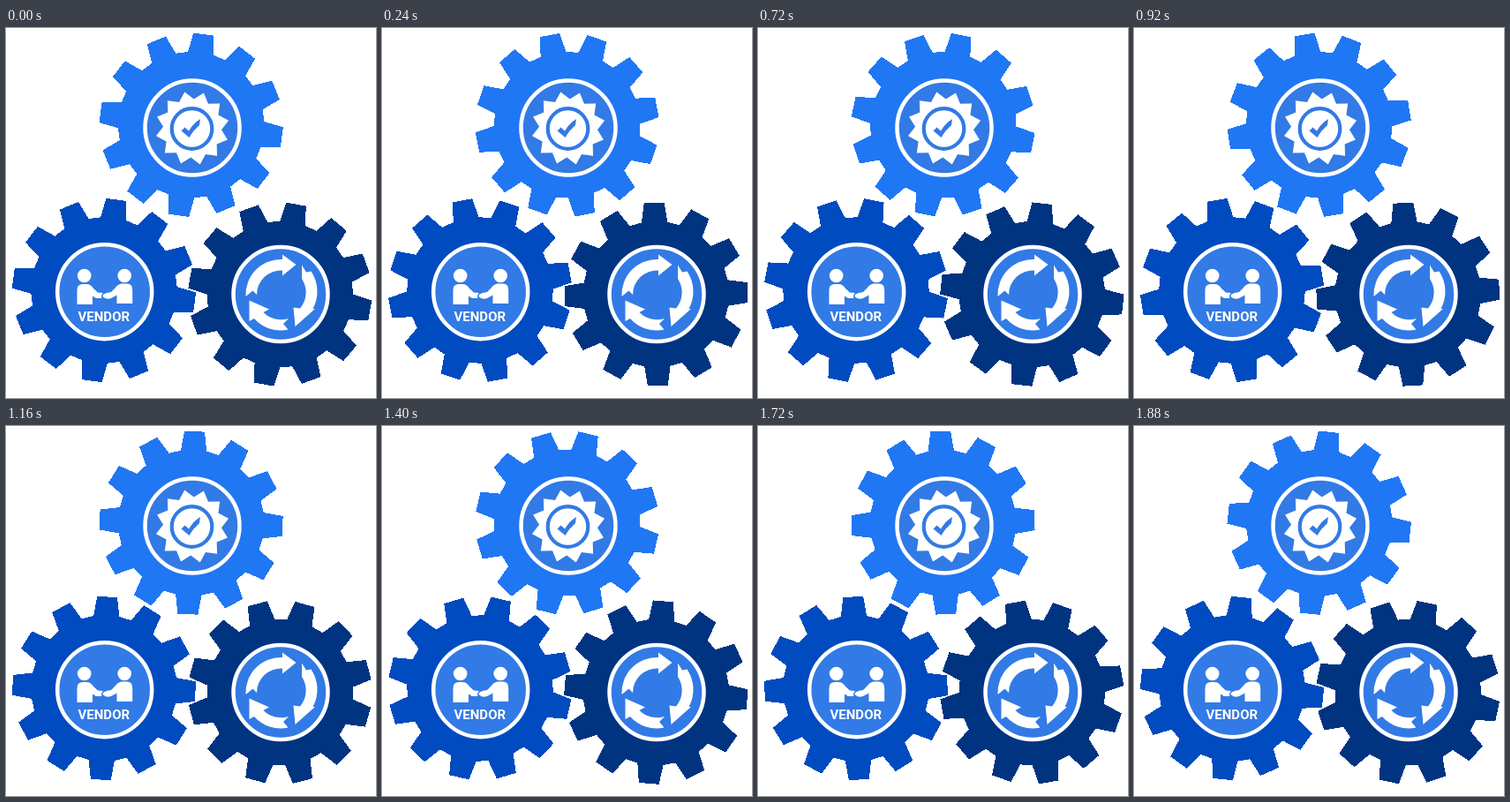
These frames come from a looping animation (419 px wide and 419 px high, 1.92 s). An HTML page:

```html
<!DOCTYPE html>
<html lang="en">
<head>
<meta charset="utf-8">
<title>Gears</title>
<style>
html, body { margin: 0; width: 100%; height: 100%; overflow: hidden; background: #fff; }
svg { display: block; width: 100vw; height: 100vh; }
.gear { shape-rendering: crispEdges; }
.disc { fill: #327ae5; stroke: #fff; stroke-width: 4.5; }
.icon { fill: #fff; }
text { font: 700 15px Roboto, Arial, sans-serif; text-anchor: middle; }
</style>
</head>
<body>
<svg viewBox="0 0 419 419">
  <path class="gear" fill="#2077f4"/>
  <path class="gear" fill="#004bbf"/>
  <path class="gear" fill="#003481"/>

  <circle class="disc" cx="211" cy="113" r="53.5"/>
  <circle class="disc" cx="111.700" cy="298.700" r="53.500"/>
  <circle class="disc" cx="311" cy="301.500" r="53.500"/>

  <g class="icon">
    <path id="seal"/>
    <circle cx="210.500" cy="114" r="22.800" fill="none" stroke="#327ae5" stroke-width="4.200"/>
    <path fill="#327ae5" d="M198.500 116.500L202.500 112.500L207 116.500Q212 108 220 103L219 110Q212 116 207.500 124Z"/>
  </g>

  <g class="icon">
    <circle cx="88.700" cy="280.500" r="7.800"/>
    <path d="M80.500 313V297Q80.500 290 87 290H91Q96 290 99 295L104 299.500L110 300Q107 303 108.500 306L102 306L98 303.500V313Z"/>
    <circle cx="134.200" cy="280.500" r="7.800"/>
    <path d="M143.200 312V296.500Q143.200 289.500 137 289.500H132Q127 289.500 124 294L119 299L114 300Q109.500 301 109.500 304Q113 308 119 306L125.500 302.500V312Z"/>
    <text x="110.800" y="332">VENDOR</text>
  </g>

  <g class="icon">
    <path d="M271.500 304A40 40 0 0 1 313 262V256.500L328.500 268L313 280.500V274.500A27.500 27.500 0 0 0 284 302L279.500 297.500Z"/>
    <path d="M335 268.500L340 276.500L345.500 275.500A41 41 0 0 1 347.500 318H350L327.500 338L325.500 316.500L333 317.500A28 28 0 0 0 335 284Z"/>
    <path d="M319.500 341.500A40 40 0 0 1 281 329L275.500 332V308.500L298 318.500L291.500 322A28 28 0 0 0 320 329L314 335Z"/>
  </g>
</svg>
<script>
const LOOP = 1920, STEP = 40, TURN = 90, TEETH = 12;
const gears = [
  { x: 209.7, y: 109.7, phase: 7.7, dir: 1 },
  { x: 111, y: 297, phase: 7.6, dir: 1 },
  { x: 310.3, y: 301.6, phase: 10.1, dir: -1 }
];

function polar(r, deg) {
  const a = deg * Math.PI / 180;
  return (r * Math.cos(a)).toFixed(2) + ' ' + (r * Math.sin(a)).toFixed(2);
}

// Repeats the [radius, angle] corners around the centre.
function ring(corners) {
  const points = [];
  for (let i = 0; i < TEETH; i++)
    for (const [r, a] of corners) points.push(polar(r, a + i * 360 / TEETH));
  return 'M' + points.join('L') + 'Z';
}

const toothed = ring([[82.8, -10.2], [104.2, -6.3], [104.2, 6.3], [82.8, 10.2]]);
const shapes = [...document.querySelectorAll('.gear')];
shapes.forEach(s => s.setAttribute('d', toothed));

const seal = document.getElementById('seal');
seal.setAttribute('d', ring([[42, 18], [33, 33]]));
seal.setAttribute('transform', 'translate(211 113.5)');

function draw(now) {
  const t = Math.floor(now % LOOP / STEP) * STEP;
  gears.forEach((g, i) => {
    const angle = g.phase + g.dir * TURN * t / LOOP;
    shapes[i].setAttribute('transform', `translate(${g.x} ${g.y}) rotate(${angle})`);
  });
}

let start;
function tick(now) {
  start ??= now;
  draw(now - start);
  requestAnimationFrame(tick);
}
draw(0);
requestAnimationFrame(tick);
</script>
</body>
</html>
```
